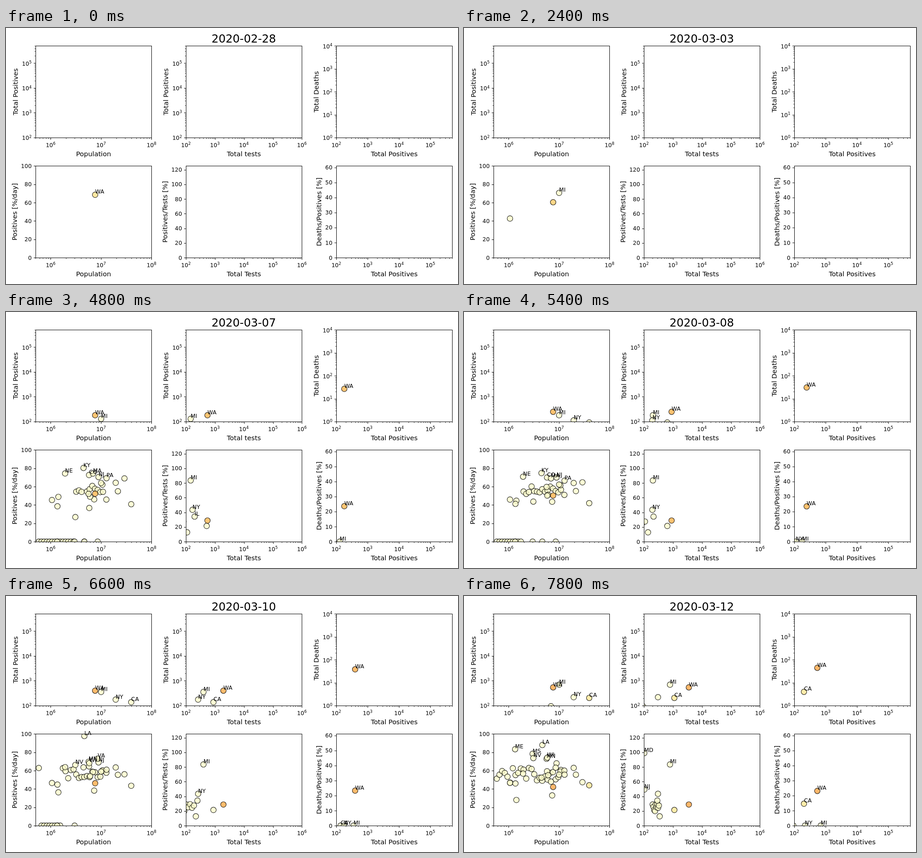
An HTML page with a canvas that plays this animation: 995x563 px, repeating every 8 s.

```html
<!DOCTYPE html>
<html lang="en">
<head>
<meta charset="utf-8">
<title>Positives, tests and deaths by state</title>
<style>
html, body { margin: 0; width: 100%; height: 100%; overflow: hidden; background: #fff; }
canvas { display: block; }
</style>
</head>
<body>
<canvas id="stage" width="995" height="563"></canvas>
<script>
const ctx = document.getElementById("stage").getContext("2d");
const STEP = 600, LOOP = 8000, LAST_DAY = 13, PT = 88 / 72;
const W = 255.4, H = 201.6, TOP_ROW = 39.4, LOW_ROW = 303.45;

let seed = 7;
function random() {
  seed = (seed * 16807) % 2147483647;
  return seed / 2147483647;
}

// A state reports zero growth until its rise, then falls steadily or climbs to a plateau.
function growthCurve(rise, from, to) {
  const first = rise < 8 ? rise : rise === 8 ? 6 : 7;
  return day => {
    if (day < first) return undefined;
    if (day < rise) return 0;
    const u = (day - rise) / Math.max(1, LAST_DAY - rise);
    return from + (to - from) * (to > from ? 1 - (1 - u) ** 2 : u);
  };
}

const states = [];
function state(name, millions, rise, from, to, more = {}) {
  states.push({ name, pop: millions * 1e6, growth: growthCurve(rise, from, to), ...more });
}

// Unlabelled states: evenly spread in log population, larger ones rising earlier.
const QUIET = 25, TESTING = 10;
for (let i = 0; i < QUIET; i++) {
  const rise = Math.max(5, Math.round(LAST_DAY - i / 3 + (random() - .5) * 4));
  const from = 50 + 14 * random(), to = 46 + 18 * random();
  const k = QUIET - 1 - i;
  const more = k < TESTING
    ? { tests: { 8: 110 * .75 ** k, 13: 350 * .94 ** k }, ratio: 6 + 24 * Math.sqrt(random()) }
    : {};
  state("", .58 * 1.13 ** i, rise, from, to, more);
}

// Labelled or isolated states; extra series hold a few key points by day.
state("AZ", 7.28, 5, 54, 33);
state("CA", 39.5, 5, 36, 44, {
  positives: { 9: 92, 13: 204 }, tests: { 5: 515, 8: 520, 10: 794, 13: 1122 }, ratio: 21.4,
  deaths: { 13: 4 }, fatality: { 9: 0, 12: 0, 13: 14.6 }
});
state("CO", 5.76, 8, 72.7, 59.3);
state("FL", 21.5, 5, 54, 55.6);
state("GA", 10.6, 5, 64, 59);
state("HI", 1.42, 7, 53, 28);
state("IL", 12.7, 5, 24, 60, { tests: { 6: 172, 13: 290 }, ratio: 34.2 });
state("KY", 4.47, 7, 86, 52.4);
state("LA", 4.65, 10, 102.7, 88);
state("MA", 6.89, 5, 90, 48, { positives: { 12: 94 }, tests: { 12: 93 }, fatality: 0 });
state("MD", 6.05, 8, 49, 55, { tests: { 12: 103 }, ratio: 99 });
state("ME", 1.34, 13, 83.4, 83.4);
state("MI", 9.99, 2, 74, 55.6,
  { positives: { 7: 92, 13: 696 }, tests: { 7: 104, 13: 794 }, ratio: 83.5, fatality: 0 });
state("MN", 5.64, 7, 43, 73);
state("MS", 2.98, 13, 78.4, 78.4);
state("NE", 1.93, 8, 74.4, 56.8);
state("NH", 1.36, 5, 27, 46);
state("NJ", 8.88, 5, 72, 68, { tests: { 13: 104 }, ratio: 49.3 });
state("NV", 3.08, 8, 26.8, 73.7);
state("NY", 19.45, 5, 65, 63,
  { positives: { 9: 112, 12: 218 }, tests: { 6: 97, 8: 169, 12: 306 }, ratio: 43.4, fatality: 0 });
state("PA", 12.8, 7, 72, 55.6);
state("RI", 1.06, 2, 40.7, 46.7);
state("TX", 29, 5, 82, 47.4);
state("VA", 8.54, 10, 78, 63.3);
state("WA", 7.61, 0, 68.6, 42.2, {
  positives: { 6: 95, 10: 343, 13: 543 }, tests: { 6: 97, 8: 555, 10: 1465, 13: 3545 },
  ratio: { 6: 0, 7: 28.8 }, deaths: { 0: 5.6, 6: 20.4, 10: 35.3, 13: 44.5 },
  fatality: { 6: 23.8, 13: 23.1 }
});
state("WI", 5.82, 8, 36.7, 74.2);

function valueAt(series, day) {
  if (typeof series === "function") return series(day);
  if (typeof series !== "object") return series;
  const days = Object.keys(series).map(Number);
  if (day < days[0]) return undefined;
  const i = days.findIndex(d => d > day);
  if (i < 0) return series[days[days.length - 1]];
  const a = series[days[i - 1]], b = series[days[i]];
  const k = (day - days[i - 1]) / (days[i] - days[i - 1]);
  return a > 0 && b > 0 ? a * (b / a) ** k : a + (b - a) * k;
}

const logAxis = (key, label, min, max) => ({ key, label, min, max, log: true });
const linAxis = (key, label, max, step) => ({ key, label, min: 0, max, step });
const popAxis = logAxis("pop", "Population", 5e5, 1e8);
const posAxis = logAxis("positives", "Total Positives", 100, 5e5);
const testAxis = label => logAxis("tests", label, 100, 1e6);

// Rules that decide which points carry a label.
const rank = (rows, row, key) => rows.filter(r => r[key] > row[key]).length;
const always = () => true;
const mostTested = (row, rows) => rank(rows, row, "tests") < 6;
const fastest = (row, rows) => rank(rows, row, "growth") <
  Math.max(1, Math.round(.12 * rows.filter(r => r.growth >= 0).length));
const highRatio = (row, rows, day) => row.ratio > (day < 9 ? 33 : day < 13 ? 40 : 47);

const panel = (col, top, x, y, named) => ({ left: 65 + 331 * col, top, x, y, named });
const panels = [
  panel(0, TOP_ROW, popAxis, posAxis, always),
  panel(1, TOP_ROW, testAxis("Total tests"), posAxis, mostTested),
  panel(2, TOP_ROW, posAxis, logAxis("deaths", "Total Deaths", 1, 1e4), always),
  panel(0, LOW_ROW, popAxis, linAxis("growth", "Positives [%/day]", 100, 20), fastest),
  panel(1, LOW_ROW, testAxis("Total Tests"), linAxis("ratio", "Positives/Tests [%]", 125, 20), highRatio),
  panel(2, LOW_ROW, posAxis, linAxis("fatality", "Deaths/Positives [%]", 61, 10), always)
];

const fraction = (axis, v) => axis.log
  ? Math.log(v / axis.min) / Math.log(axis.max / axis.min)
  : (v - axis.min) / (axis.max - axis.min);

const ramp = [[255, 255, 204], [255, 237, 160], [254, 217, 118], [254, 178, 76], [253, 141, 60]];
function fillFor(deaths) {
  const p = deaths > 1 ? Math.log10(deaths) * 2 : 0;
  const i = Math.min(3, Math.floor(p));
  const rgb = ramp[i].map((c, n) => Math.round(c + (ramp[i + 1][n] - c) * (p - i)));
  return `rgba(${rgb},0.8)`;
}

function text(str, x, y, size, align = "left") {
  ctx.font = `${size * PT}px "DejaVu Sans", sans-serif`;
  ctx.textAlign = align;
  ctx.fillStyle = "#000";
  ctx.fillText(str, x, y);
  return ctx.measureText(str).width;
}

function power(n, x, y) {
  const w = text("10", x, y, 10);
  text(String(n), x + w + .2, y - 4.7, 7);
}

const snap = v => Math.round(v) + .5;
function line(x1, y1, x2, y2, width) {
  ctx.lineWidth = width;
  ctx.beginPath();
  ctx.moveTo(x1, y1);
  ctx.lineTo(x2, y2);
  ctx.stroke();
}

function ticks(axis) {
  const list = [];
  if (!axis.log) {
    for (let v = 0; v <= axis.max; v += axis.step) list.push({ v, major: true });
    return list;
  }
  for (let n = Math.floor(Math.log10(axis.min)); 10 ** n <= axis.max; n++)
    for (let m = 1; m < 10; m++) {
      const v = m * 10 ** n;
      if (v >= axis.min && v <= axis.max) list.push({ v, n, major: m === 1 });
    }
  return list;
}

function drawAxes({ left, top, x, y }) {
  const bottom = top + H, x0 = snap(left), y0 = snap(bottom);
  ctx.strokeStyle = "#000";
  for (const t of ticks(x)) {
    const px = left + fraction(x, t.v) * W;
    line(snap(px), y0, snap(px), y0 + (t.major ? 4.3 : 2.5), t.major ? 1 : .73);
    if (t.major) power(t.n, px - 10.6, bottom + 20.8);
  }
  let labelWidth = 21;
  for (const t of ticks(y)) {
    const py = bottom - fraction(y, t.v) * H;
    line(x0, snap(py), x0 - (t.major ? 4.3 : 2.5), snap(py), t.major ? 1 : .73);
    if (!t.major) continue;
    if (y.log) power(t.n, left - 29.8, py + 5.3);
    else labelWidth = text(String(t.v), left - 8.6, py + 4.5, 10, "right") - .6;
  }
  ctx.lineWidth = 1;
  ctx.strokeRect(x0, snap(top), snap(left + W) - x0, y0 - snap(top));
  text(x.label, left + W / 2, bottom + 40.6, 12, "center");
  ctx.save();
  ctx.translate(left - 18.5 - labelWidth, top + H / 2);
  ctx.rotate(-Math.PI / 2);
  text(y.label, 0, 0, 12, "center");
  ctx.restore();
}

function drawPanel(panel, rows, day) {
  const { left, top, x, y, named } = panel;
  const points = rows.filter(r => r[x.key] !== undefined && r[y.key] !== undefined).map(row => {
    const fx = fraction(x, row[x.key]), fy = fraction(y, row[y.key]);
    const inside = fx >= 0 && fx <= 1 && fy >= 0 && fy <= 1;
    return { row, inside, px: left + fx * W, py: top + H - fy * H };
  });
  ctx.save();
  ctx.beginPath();
  ctx.rect(left, top, W, H);
  ctx.clip();
  ctx.lineWidth = PT;
  ctx.strokeStyle = "rgba(0,0,0,0.8)";
  for (const { row, px, py } of points) {
    ctx.beginPath();
    ctx.arc(px, py, 5 * PT, 0, 2 * Math.PI);
    ctx.fillStyle = fillFor(row.deaths);
    ctx.fill();
    ctx.stroke();
  }
  ctx.restore();
  drawAxes(panel);
  for (const { row, inside, px, py } of points)
    if (inside && named(row, rows, day)) text(row.name, px, py - 2.3, 10);
}

function draw(day) {
  ctx.fillStyle = "#fff";
  ctx.fillRect(0, 0, 995, 563);
  const rows = states.map(s =>
    Object.fromEntries(Object.entries(s).map(([key, series]) => [key, valueAt(series, day)])));
  for (const panel of panels) drawPanel(panel, rows, day);
  const date = new Date(Date.UTC(2020, 1, 28 + day)).toISOString().slice(0, 10);
  text(date, 523.4, 32.3, 20, "center");
}

const start = performance.now();
function tick() {
  draw(Math.floor((performance.now() - start) % LOOP / STEP));
  requestAnimationFrame(tick);
}
tick();
</script>
</body>
</html>
```
